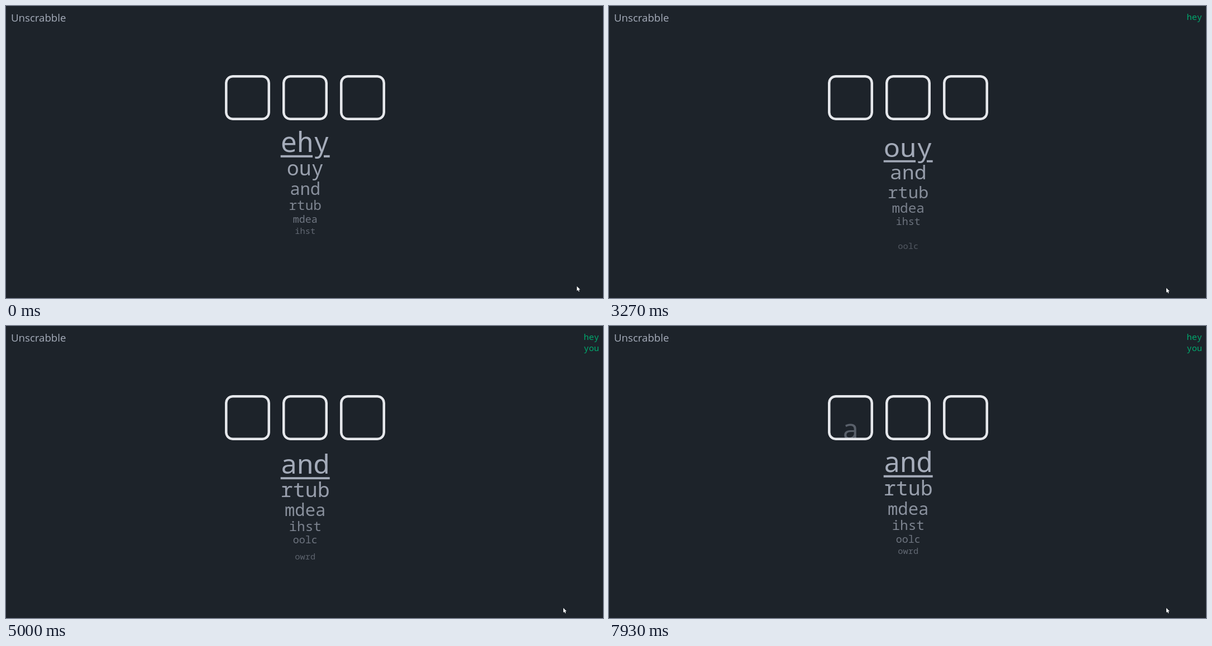
An HTML page that plays this animation: 1069 by 524 pixels, repeating every 8000 ms.

```html
<!DOCTYPE html>
<html lang="en">
<head>
<meta charset="utf-8">
<title>Word game</title>
<style>
html, body { margin: 0; width: 100%; height: 100%; overflow: hidden; background: #1d232a; }
body { position: relative; color: #a6adbb; font-family: "Noto Sans Mono", monospace; }
.text { position: absolute; left: 0; top: 0; line-height: 0; white-space: pre; transform-origin: 0 0; }
.title { font-family: "Open Sans", sans-serif; }
.current { text-decoration: underline 4px; text-underline-offset: 5.5px; }
.box { position: absolute; top: 124px; width: 81px; height: 81px; border-radius: 14px; overflow: hidden; }
.ring { position: absolute; inset: 0; border-radius: 14px; box-shadow: inset 0 0 0 4.5px; }
svg { position: absolute; left: 0; top: 0; overflow: visible; }
</style>
</head>
<body>
<svg id="cursor" width="6" height="10"><path fill="#fff" d="M0 0V8.2L1.9 6.5 3.2 9.5 4.5 8.9 3.3 6H5.8Z"/></svg>
<script>
const LOOP = 8000, STEP = 200 / 3, CENTER = 535.7;
const GRAY = '#a6adbb', WHITE = '#e5e7eb', GREEN = '#00a96e', RED = '#ff5861';
const WORDS = ['ehy', 'ouy', 'and', 'rtub', 'mdea', 'ihst', 'oolc', 'owrd'];
const SIZES = [48.9, 36.7, 30.6, 24.4, 18.3, 15.3];
const BASELINES = [261.7, 304, 338.7, 366.7, 388.8, 408.8];
const SUBMITS = [2870, 4401];
const SHAKE = 6890;

// Each attempt: letters, typing times, removal times, tint once complete
const ATTEMPTS = [
  { word: 'hey', typed: [2070, 2150, 2270], gone: [2870, 2870, 2870], tint: GREEN },
  { word: 'you', typed: [3740, 3880, 4000], gone: [4401, 4401, 4401], tint: GREEN },
  { word: 'and', typed: [6140, 6260, 6480], gone: [7900, 7720, 7560], tint: RED }
];

const clamp = v => Math.max(0, Math.min(1, v));
const easeOut = v => 1 - (1 - clamp(v)) ** 2;
const mix = (a, b, p) => a + (b - a) * p;
const settle = ms => 1 - (1 + 0.0035 * ms) * Math.exp(-0.006 * ms);

function add(parent, cls, content = '') {
  const el = document.createElement('div');
  el.className = cls;
  el.textContent = content;
  parent.append(el);
  return el;
}

// Puts text with its baseline at y; anchor is the share of its width left of x
function place(el, x, y, size, { opacity = 1, stretch = 1, anchor = 0.5 } = {}) {
  el.style.fontSize = size + 'px';
  el.style.opacity = opacity;
  el.style.transform =
    `translate(${x}px, ${y}px) scaleY(${stretch}) translate(${-100 * anchor}%, -0.388em)`;
}

const body = document.body;
const cursor = document.getElementById('cursor');
place(add(body, 'text title', 'Unscrabble'), 9, 28.3, 18.65, { anchor: 0 });

const rows = WORDS.map(word => add(body, 'text', word));
const boxes = [0, 1, 2].map(i => {
  const el = add(body, 'box');
  el.style.left = 392 + 103 * i + 'px';
  const letter = add(el, 'text');
  return { el, letter, ring: add(el, 'ring') };
});
const solved = ['hey', 'you'].map(word => {
  const el = add(body, 'text', word);
  el.style.color = GREEN;
  return el;
});
body.append(cursor);

function drawList(t, failed) {
  const done = SUBMITS.filter(s => t >= s).length;
  const since = done ? t - SUBMITS[done - 1] : 0;
  const p = done ? settle(since) : 1;
  rows.forEach((el, i) => {
    const r = i - done;
    el.classList.toggle('current', r <= 0);
    el.style.color = r === 0 && failed ? RED : GRAY;
    if (r === -1) {
      const q = easeOut(since / 200);
      place(el, CENTER + 130 * q, BASELINES[0] - 33 * q, SIZES[0], { opacity: 1 - q });
    } else if (r < 0 || r > 5) {
      el.style.opacity = 0;
    } else if (r === 5) {
      place(el, CENTER, BASELINES[5] + 124 * (1 - p), SIZES[5], { opacity: 0.5 * p });
    } else {
      place(el, CENTER, mix(BASELINES[r + 1], BASELINES[r], p), SIZES[r], {
        opacity: mix(0.9 - 0.1 * r, 1 - 0.1 * r, p),
        stretch: mix(SIZES[r + 1] / SIZES[r], 1, p)
      });
    }
  });
  solved.forEach((el, i) => place(el, 1062, 24.8 + 20 * i, SIZES[5], {
    anchor: 1,
    opacity: easeOut((t - SUBMITS[i] - 100) / 300)
  }));
}

function drawBoxes(t, attempt, complete) {
  const s = t - SHAKE;
  const shift = s > 0 && s < 400 ? 2.7 * Math.sin(s * Math.PI / 100) : 0;
  boxes.forEach(({ el, letter, ring }, i) => {
    el.style.transform = `translateX(${shift}px)`;
    ring.style.color = complete ? attempt.tint : WHITE;
    letter.textContent = attempt ? attempt.word[i] : '';
    if (!attempt) return;
    const shown = easeOut((t - attempt.typed[i]) / 200) * (1 - easeOut((t - attempt.gone[i]) / 100));
    const tinted = complete || (attempt.tint === GREEN && t >= attempt.typed[2]);
    letter.style.color = tinted ? attempt.tint : GRAY;
    place(letter, 40.5, 63.7 + 26.7 * (1 - shown), SIZES[0], { opacity: shown });
  });
}

function drawCursor(t) {
  const p = clamp((t - 340) / 390);
  const q = p * p * (3 - 2 * p);
  const x = t < 130 ? 1022.3 : mix(1021.5, 998, q);
  const y = t < 130 ? 503 : t < 860 ? mix(502.7, 504.7, q) : 506;
  cursor.style.transform = `translate(${x}px, ${y}px)`;
}

function draw(now) {
  const t = Math.floor((now % LOOP + 4) / STEP) * STEP;
  const attempt = ATTEMPTS.find(a => t >= a.typed[0] && t < a.gone[0] + 100);
  const complete = attempt && t >= attempt.typed[2] && t < attempt.gone[2];
  drawList(t, complete && attempt.tint === RED);
  drawBoxes(t, attempt, complete);
  drawCursor(t);
}

const start = performance.now();
function tick() {
  draw(performance.now() - start);
  requestAnimationFrame(tick);
}
tick();
</script>
</body>
</html>
```
